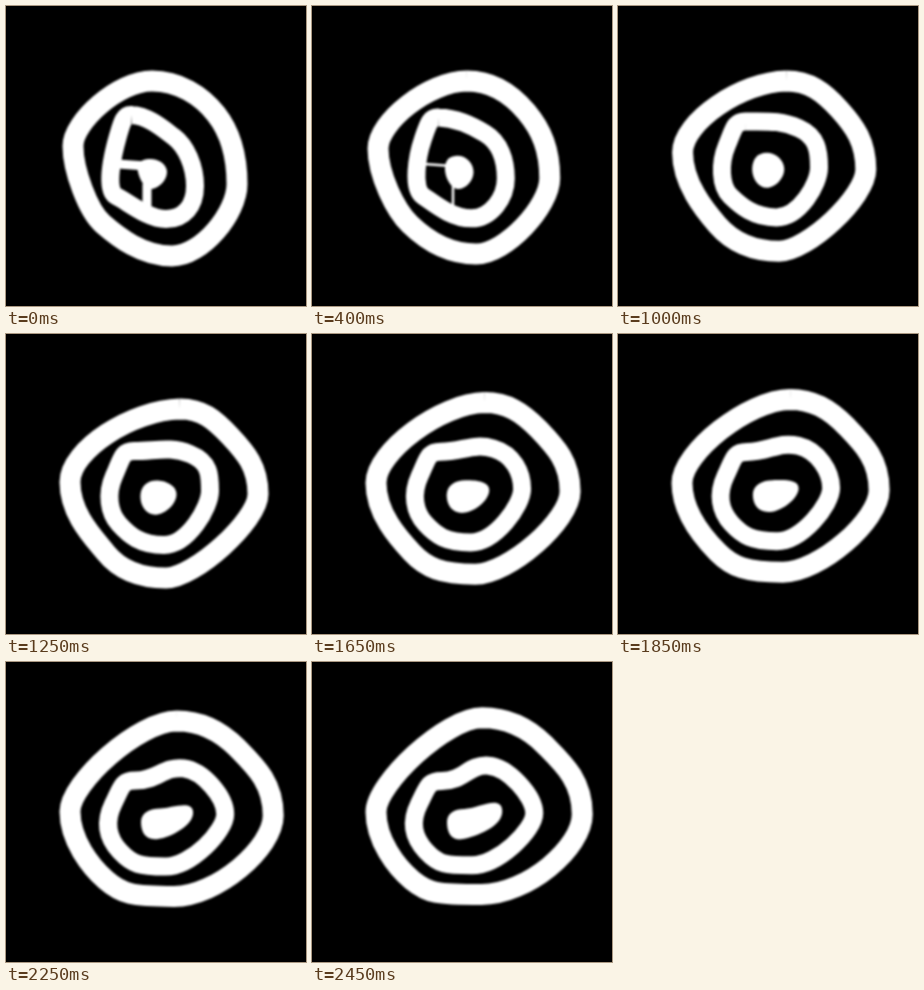
Write an HTML page without scripts that moves like this. It is 300 px wide and 300 px high and loops after 2.5 s.

```html
<!DOCTYPE html>
<html lang="en">
<head>
<meta charset="utf-8">
<title>Drifting rings</title>
<style>
  html, body { margin: 0; width: 100%; height: 100%; overflow: hidden; background: #000; }
  svg { display: block; width: 100vw; height: 100vh; filter: blur(1px); }
  path { fill: none; stroke: #fff; animation: 2.5s linear infinite; }
  .outer { stroke-width: 21px; animation-name: outer; }
  .inner { stroke-width: 18px; animation-name: inner; }
  .core { fill: #fff; stroke: none; animation-name: core; }
  .arms { animation-name: arms; }

  @keyframes outer {
    0% { d: path("M146 75C172 75 195 89 210 108S231 149 231 178S196 250 166 250S112 231 97 218S67 164 67 140S112 75 146 75"); }
    50% { d: path("M174 75C196 75 208 85 224 102S252 133 252 160S188 244 160 244S113 235 100 219S64 180 64 148S126 76 174 75"); }
    100% { d: path("M170 55C192 55 214 63 233 82S271 118 271 152S216 232 170 232S116 231 100 218S64 178 64 150S134 55 170 55"); }
  }
  @keyframes inner {
    0% { d: path("M126 109C142 110 156 122 168 131S189 160 189 180S178 213 160 213S122 196 110 190S108 144 112 130S118 108 126 109"); }
    50% { d: path("M128 117C150 117 164 112 184 120S204 141 204 157S182 211 158 211S123 201 113 190S100 160 108 142S116 117 128 117"); }
    100% { d: path("M130 119C152 119 156 102 176 103S223 134 223 151S186 203 160 203S127 203 114 189S98 160 107 142S116 119 130 119"); }
  }
  @keyframes core {
    0% { d: path("M142 153C152 152 161 158 161 166S153 182 146 183S134 174 132 166S134 154 142 153"); }
    30% { d: path("M147 147C156 147 162 157 162 166S155 183 148 183S134 174 134 164S138 147 147 147"); }
    82% { d: path("M156 146C164 146 184 142 184 152S166 176 153 177S135 170 135 160S146 146 156 146"); }
    100% { d: path("M152 147C165 147 190 131 191 148S164 174 151 177S135 169 135 160S142 147 152 147"); }
  }
  /* Bridges between core and inner ring thin out early */
  @keyframes arms {
    0% { stroke-width: 9px; }
    22%, 100% { stroke-width: 0; }
  }
</style>
</head>
<body>
<svg viewBox="0 0 300 300">
  <path class="outer"/>
  <path class="inner"/>
  <path class="core"/>
  <path class="arms" d="M112 158L140 160M141 178V200"/>
</svg>
</body>
</html>
```
